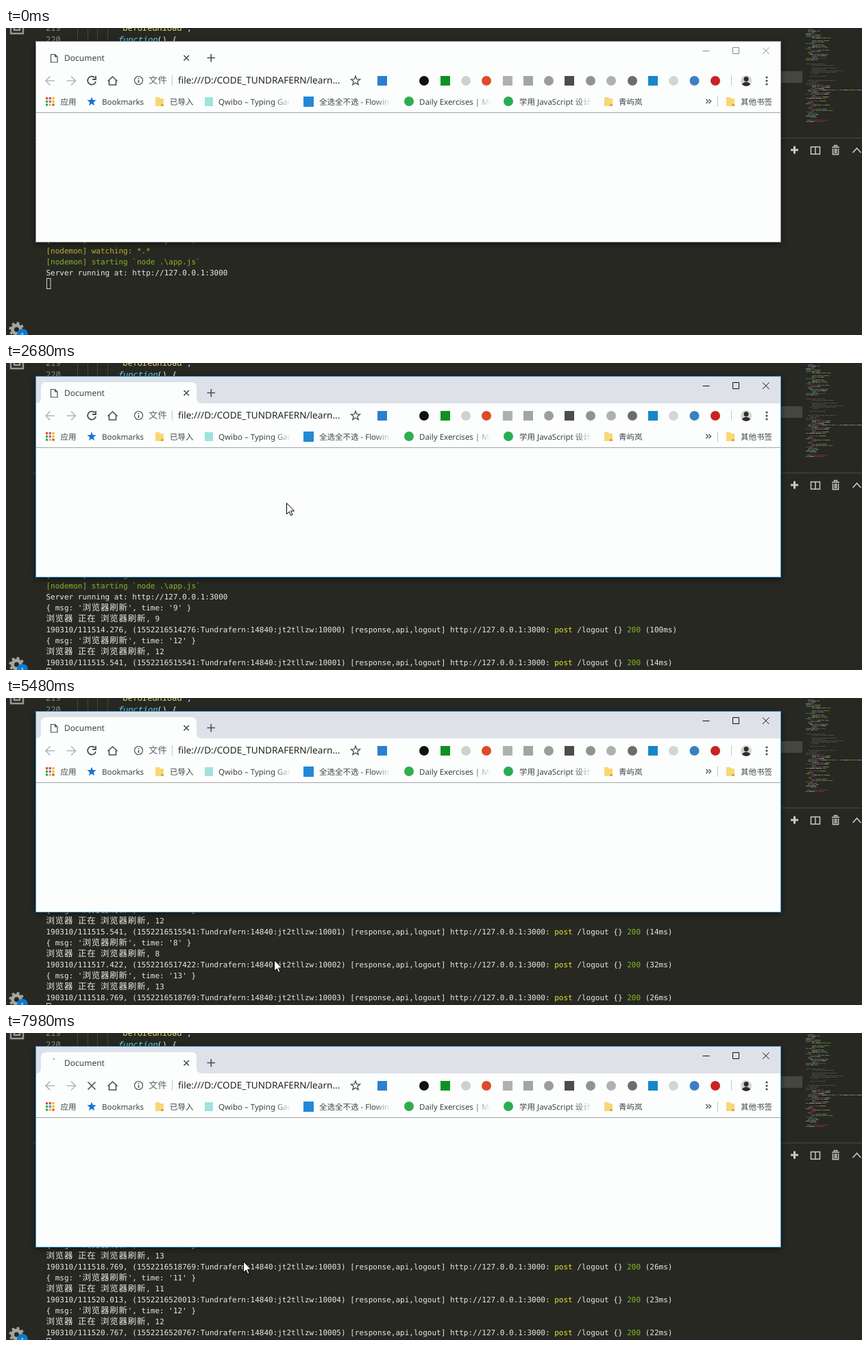
Recreate the animation shown at these times as an HTML page. Size 1249 by 448 pixels, loop 8 s.

```html
<!DOCTYPE html>
<html lang="zh">
<head>
<meta charset="utf-8">
<title>Refresh log</title>
<style>
  html, body { margin: 0; width: 100%; height: 100%; overflow: hidden; background: #272822; }
  svg { display: block; text-rendering: geometricPrecision; }
  text { white-space: pre; font: 11.5px "Noto Sans", "Noto Sans CJK SC", sans-serif; fill: #3f4246; }
  .code text { font: 12px "Noto Sans Mono", "DejaVu Sans Mono", monospace; fill: #90908a; }
  #term text { font: 11px "DejaVu Sans Mono", monospace; fill: #e8e8e3; }
  .cjk { font: 12.5px "Noto Sans CJK SC", sans-serif; letter-spacing: .75px; }
  .line { fill: none; stroke: #4a4d51; stroke-width: 1.6; }
</style>
</head>
<body>
<svg width="1249" height="448" viewBox="0 0 1249 448">
  <defs>
    <linearGradient id="fade">
      <stop offset="0" stop-color="#fcfefd" stop-opacity="0"/>
      <stop offset="1" stop-color="#fcfefd"/>
    </linearGradient>
    <filter id="blur" x="-5%" y="-10%" width="110%" height="120%"><feGaussianBlur stdDeviation="5"/></filter>
  </defs>

  <g class="code">
    <path d="M104.5 0V19M119.5 0V19M133.5 0V19M148.5 0V19" stroke="#464741"/>
    <text x="58" y="4">219</text>
    <text x="58" y="21">220</text>
    <text x="163" y="4" style="fill:#e6db74">"beforeunload"<tspan fill="#f8f8f2">,</tspan></text>
    <text x="163" y="21" style="fill:#66d9ef"><tspan font-style="italic">function</tspan><tspan fill="#f8f8f2">() {</tspan></text>
  </g>
  <path d="M7 -8V8H25V-2M12 -8V3H20V-8" fill="none" stroke="#989892" stroke-width="2.5"/>
  <circle cx="15.5" cy="440" r="6" fill="none" stroke="#a5a5a0" stroke-width="5"/>
  <circle cx="15.5" cy="440" r="9.5" fill="none" stroke="#a5a5a0" stroke-width="3" stroke-dasharray="3.73"/>
  <circle cx="24" cy="447" r="8" fill="#0a7ad1"/>
  <text x="21" y="452" style="fill:#fff;font-size:10px">1</text>
  <path d="M40 160.5H1249" stroke="#4b4b40"/>
  <rect x="1131" y="63" width="31" height="17" fill="#454640"/>
  <g id="map" opacity=".8"></g>
  <g fill="none" stroke="#c9c9c6">
    <path d="M1150.5 172.5V183.5M1145 178H1156" stroke-width="3"/>
    <path d="M1174.5 173.5H1187.5V184H1174.5ZM1181 173V184M1174 173.5H1188" stroke-width="1.5"/>
    <path d="M1205 174H1216M1208.5 173V171.5H1212.5V173M1206.5 176V184.5H1214.5V176M1209.5 176V183M1211.5 176V183" stroke-width="1.5"/>
    <path d="M1235.5 182L1241.5 175.5L1247.5 182" stroke-width="1.6"/>
  </g>

  <g id="term"><rect id="caret" x="59.5" width="5.5" height="15" fill="none" stroke="#d4d4d0"/></g>

  <rect x="43" y="22" width="1088" height="293" opacity=".5" filter="url(#blur)"/>
  <rect id="frame" x="43.5" y="19.5" width="1087" height="293" fill="#fcfefd"/>
  <g id="strip">
    <rect x="44" y="20" width="1086" height="39" fill="#dee1e8"/>
    <path d="M44 60V59Q51 59 51 51V36Q51 28 59 28H270Q278 28 278 36V51Q278 59 286 59V60Z" fill="#fcfefd"/>
  </g>
  <path id="buttons" d="M1016.5 33.5H1026.5M1060.5 28.5H1069.5V37.5H1060.5ZM1104 28.5L1113.5 38M1113.5 28.5L1104 38" fill="none"/>
  <path d="M44 123.5H1130" stroke="#a3a5a4"/>

  <path id="page" class="line" style="stroke-width:1.2" d="M65.5 38.5H71.5L75 42V50H65.5ZM71.5 38.5V42H75"/>
  <path id="spin" d="M68.5 38.2L71 37.8" stroke="#8a8d92" stroke-width="1.5"/>
  <text x="85" y="48" style="font-size:12px">Document</text>
  <path class="line" d="M259.5 40L267 47.5M267 40L259.5 47.5M293.5 43.5H305M299.3 38V49.5"/>

  <path class="line" style="stroke:#b4b7ba" d="M71 77H58.5M64.5 70.5L58 77L64.5 83.5M88.5 77H101M95 70.5L101.5 77L95 83.5"/>
  <path id="reload" class="line" style="stroke-width:1.8" d="M129.5 72.5A6 6 0 1 0 131 78M131 70V75H126"/>
  <path id="stop" class="line" d="M119.5 71.5L130.5 82.5M130.5 71.5L119.5 82.5"/>
  <path class="line" d="M148.5 77.5L155.5 71L162.5 77.5M150.5 76V83H160.5V76"/>
  <circle class="line" style="stroke-width:1.2" cx="193.5" cy="76.5" r="6"/>
  <path class="line" d="M193.5 73V74.5M193.5 76V80"/>
  <text x="208" y="81" style="font-size:13.5px;fill:#5f6368">文件</text>
  <path d="M242.5 69V84M1058.5 69V84M1038.5 100V115" stroke="#c3c6c9"/>
  <text x="251" y="81" style="font-size:13.6px;fill:#222">file:///D:/CODE_TUNDRAFERN/learn...</text>
  <g id="icons"></g>
  <circle cx="1080" cy="77" r="8" fill="#d5d5d3"/>
  <circle cx="1080" cy="74.5" r="3.5" fill="#2c2c2c"/>
  <path d="M1073.5 82Q1080 75 1086.5 82Q1080 88 1073.5 82Z" fill="#2c2c2c"/>
  <g fill="#4a4d51"><circle cx="1110" cy="72" r="1.6"/><circle cx="1110" cy="77" r="1.6"/><circle cx="1110" cy="82" r="1.6"/></g>
  <g id="marks"></g>
  <path class="line" d="M1021.5 104L1024.5 107L1021.5 110M1025.5 104L1028.5 107L1025.5 110" style="stroke-width:1.3"/>

  <path id="mouse" d="M-.5 .5V16.5L3.2 13L5.700 18.5L8 17.5L5.6 12H10.5Z" fill="#fff" stroke="#000"/>
</svg>

<script>
const $ = id => document.getElementById(id);
const add = (id, markup) => $(id).insertAdjacentHTML('beforeend', markup);
const box = (x, y, w, h, fill) => `<rect x="${x}" y="${y}" width="${w}" height="${h}" fill="${fill}"/>`;
const dot = (x, y, r, fill) => `<circle cx="${x}" cy="${y}" r="${r}" fill="${fill}"/>`;
const star = (x, y, r) => 'M' + [...Array(10).keys()].map(i => {
  const a = i * Math.PI / 5, k = i % 2 ? r * .42 : r;
  return `${x + k * Math.sin(a)} ${y - k * Math.cos(a)}`;
}).join('L') + 'Z';

// Minimap: short coloured strokes from a seeded generator
let seed = 11;
const rnd = () => (seed = seed * 16807 % 2147483647) / 2147483647;
let map = '';
for (let y = 0; y < 138; y += 2) {
  const dim = y > 50 && y < 84;
  if (y > 46 && y < 51 || rnd() < .12) continue;
  let x = 1167 + Math.floor(rnd() * 4) * 3 - Math.max(0, y - 130);
  const end = y == 90 ? 1243 : x + 4 + rnd() * (dim ? 38 : 24);
  while (x < end) {
    const w = 2 + rnd() * 7;
    const hue = dim ? '#55564a' : ['#a7a79d', '#928c52', '#4d8791', '#8a3252', '#6d8438'][Math.floor(rnd() * 5)];
    map += box(x, y, w, 1, hue);
    x += w + 1;
  }
}
add('map', map);

// Toolbar buttons: s = square, o = circle
const tools = [
  [549, 's', '#2b7fd0'], [610, 'o', '#111'], [641, 's', '#0c9220'], [671, 'o', '#cfd0d0'], [701, 'o', '#dc4b2b'],
  [732, 's', '#b0b0b0'], [762, 's', '#a4a4a4'], [792, 'o', '#9c9c9c'], [822, 's', '#4c4c4c'], [853, 'o', '#929292'],
  [883, 'o', '#b0b0b0'], [914, 'o', '#6c6c6c'], [944, 's', '#1687c9'], [974, 'o', '#d4d6d6'], [1004.5, 'o', '#3b80c2'],
  [1035, 'o', '#c62323']
];
add('icons', `<path class="line" style="stroke-width:1.3" d="${star(510, 77, 7)}"/>` + tools.map(([x, kind, fill]) =>
  kind == 's' ? box(x - 7, 70, 14, 14, fill) : dot(x, 77, 7, fill)).join(''));

// Bookmarks bar
const label = (x, s) => `<text x="${x}" y="111.5">${s}</text>`;
const cut = (x, s, end) => label(x, s) + box(end - 24, 98, 24, 20, 'url(#fade)') + box(end, 98, 14, 20, '#fcfefd');
const folder = (x, s) => `<path d="M${x} 101h6l1 2h5v11h-12Z" fill="#f8d775"/><path d="M${x + 8} 114v-3h4v3Z" fill="#d9a93c"/>` + label(x + 21, s);
const grid = ['#e8453c', '#e8453c', '#f6b704', '#34a853', '#4285f4', '#f6b704', '#34a853', '#f6b704', '#e8453c'];
add('marks',
  grid.map((c, i) => box(58 + i % 3 * 4.7, 101 + Math.floor(i / 3) * 4.7, 3.2, 3.2, c)).join('') + label(79.5, '应用') +
  `<path d="${star(125, 107.5, 7)}" fill="#1b73d8"/>` + label(140, 'Bookmarks') +
  folder(218, '已导入') +
  box(290, 101, 12, 13, '#9fe3dc') + cut(310, 'Qwibo – Typing Gar', 416) +
  box(434, 100, 15, 15, '#2389d6') + cut(457, '全选全不选 - Flowin', 562) +
  dot(588, 107, 7, '#2fae4e') + cut(603, 'Daily Exercises | Mo', 707) +
  dot(733, 107, 7, '#2bab55') + cut(749, '学用 JavaScript 设计', 855) +
  folder(873, '青屿岚') + folder(1051, '其他书签'));

// Terminal lines
const ink = (fill, s) => `<tspan fill="${fill}">${s}</tspan>`;
const YELLOW = '#b3b42b', GREEN = '#86b42b', BRIGHT = '#e2e22e';
const visit = ([count, at, ms], i) => [
  `{ msg: '浏览器刷新', time: '${count}' }`,
  `浏览器 正在 浏览器刷新, ${count}`,
  `190310/1115${at}, (15522165${at.replace('.', '')}:Tundrafern:14840:jt2tllzw:1000${i}) [response,api,logout] ` +
  `http://127.0.0.1:3000: ${ink(BRIGHT, 'post')} /logout {} ${ink(GREEN, 200)} (${ms}ms)`
];
const lines = [
  ink(YELLOW, '[nodemon] to restart at any time, enter `rs`'),
  ink(YELLOW, '[nodemon] watching: *.*'),
  ink(GREEN, '[nodemon] starting `node .\\app.js`'),
  'Server running at: http://127.0.0.1:3000',
  ...[[9, '14.276', 100], [12, '15.541', 14], [8, '17.422', 32], [13, '18.769', 26], [11, '20.013', 23], [12, '20.767', 22]].flatMap(visit)
];
add('term', lines.map((s, i) => `<text x="58.5" y="${313 + 16 * i}">` +
  s.replace(/[\u4e00-\u9fff]+/g, '<tspan class="cjk">$&</tspan>') + '</text>').join(''));
const rows = document.querySelectorAll('#term text');

const LOOP = 8000, FOCUS = 360;
const printed = [[0, 4], [900, 6], [980, 7], [2140, 10], [4000, 13], [5320, 16], [6730, 18], [6800, 19], [7430, 22]];
const loads = [[830, 900], [2070, 2140], [3920, 4000], [5240, 5320], [6650, 6730], [7360, 7430], [7980, 8000]];
// Pointer path: time, x, y
const path = [
  [55, 600, 392], [130, 551, 267], [205, 441, 232], [280, 428, 219], [355, 408, 203], [2600, 408, 203], [2680, 410, 204],
  [2830, 469, 300], [2980, 460, 380], [3130, 418, 380], [3330, 418, 380], [3400, 344, 238], [3450, 316, 182], [3520, 311, 140],
  [4100, 311, 140], [4330, 382, 298], [4540, 390, 385], [4600, 390, 385], [4780, 334, 253], [4950, 297, 168],
  [5230, 297, 168], [5455, 392, 382], [5930, 392, 382], [6050, 347, 282], [6160, 341, 217], [6800, 341, 217],
  [6980, 347, 300], [7230, 337, 219], [7640, 337, 219], [7930, 347, 333], [8000, 347, 333]
];

const show = (el, on) => el.setAttribute('visibility', on ? 'visible' : 'hidden');

function pointer(t) {
  t = Math.floor((t + 20) / 75) * 75 - 20;
  const i = Math.max(1, path.findIndex(p => p[0] >= t));
  const [t0, x0, y0] = path[i - 1], [t1, x1, y1] = path[i];
  const k = Math.max(0, (t - t0) / (t1 - t0));
  return [x0 + (x1 - x0) * k, y0 + (y1 - y0) * k].map(Math.round);
}

function draw(t) {
  const active = t >= FOCUS;
  show($('strip'), active);
  $('frame').setAttribute('stroke', active ? '#2f93d8' : '#8b8d8c');
  $('buttons').setAttribute('stroke', active ? '#111' : '#8c8c8c');

  const count = printed.filter(p => p[0] <= t).pop()[1];
  rows.forEach((row, i) => show(row, i < count));
  $('term').setAttribute('transform', `translate(0 ${-16 * Math.max(0, count - 9)})`);
  $('caret').setAttribute('y', 301.5 + 16 * count);

  const loading = loads.some(([a, b]) => t >= a && t < b);
  show($('spin'), loading);
  show($('stop'), loading);
  show($('page'), !loading);
  show($('reload'), !loading);

  $('mouse').setAttribute('transform', `translate(${pointer(t)})`);
  show($('mouse'), t >= 70 && !(t >= 6650 && t < 6800));
}

const start = performance.now();
function tick() {
  draw((performance.now() - start) % LOOP);
  requestAnimationFrame(tick);
}
tick();
</script>
</body>
</html>
```
